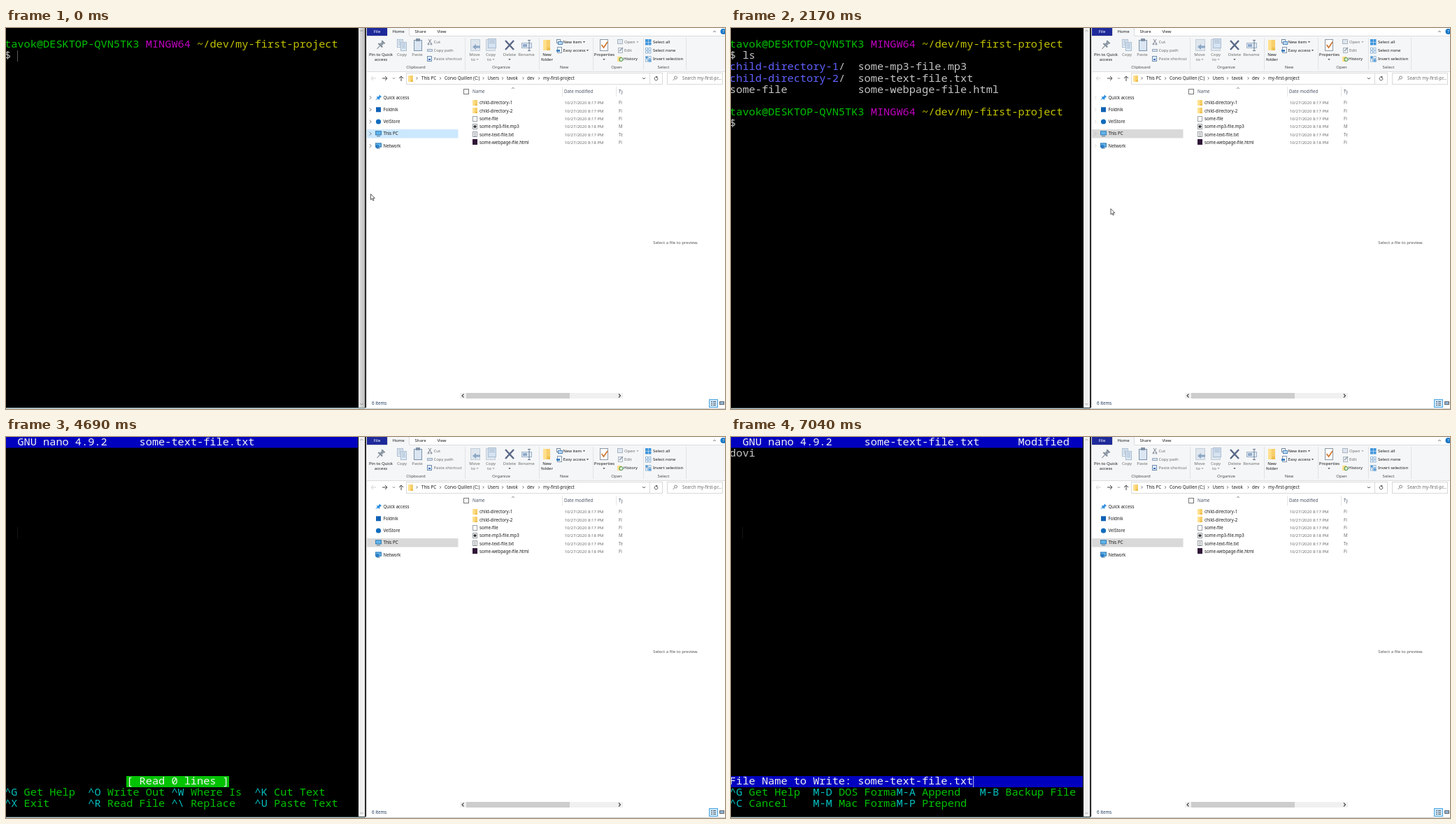
Animation of 1028x545 px, one loop 8 s. Source, as an HTML page with a canvas:

```html
<!DOCTYPE html>
<html lang="en">
<head>
<meta charset="utf-8">
<title>Terminal and file explorer</title>
<style>
html, body { margin: 0; width: 100%; height: 100%; overflow: hidden; background: #fff; }
canvas { display: block; width: 100vw; height: 100vh; }
</style>
</head>
<body>
<canvas id="stage" width="1028" height="545"></canvas>
<script>
const W = 1028, H = 545, LOOP = 8000;
const USER = 'tavok', HOST = 'DESKTOP-QVN5TK3', DIR = 'my-first-project', FILE = 'some-text-file.txt';
const MONO = '15.28px "Noto Sans Mono", "DejaVu Sans Mono", monospace';
const SANS = '"Noto Sans", "Open Sans", sans-serif';
const C = { text: '#c4c4c4', green: '#00c200', cyan: '#00bfbf', blue: '#6060ff', pink: '#bf00bf',
  gold: '#c2c200', bar: '#0000bf', white: '#f4f4f4', ink: '#1a1a1a', dim: '#6e6e6e' };

const stage = document.getElementById('stage').getContext('2d');
const backdrop = document.createElement('canvas');
backdrop.width = W;
backdrop.height = H;
let g = backdrop.getContext('2d');

function box(x, y, w, h, fill, stroke) {
  if (fill) { g.fillStyle = fill; g.fillRect(x, y, w, h); }
  if (stroke) { g.strokeStyle = stroke; g.lineWidth = 1; g.strokeRect(x + .5, y + .5, w - 1, h - 1); }
}
function path(pts, stroke, width = 1, fill) {
  g.beginPath();
  for (let i = 0; i < pts.length; i += 2) g.lineTo(pts[i], pts[i + 1]);
  if (fill) { g.closePath(); g.fillStyle = fill; g.fill(); }
  if (stroke) { g.strokeStyle = stroke; g.lineWidth = width; g.stroke(); }
}
function dot(x, y, r, fill, stroke) {
  g.beginPath();
  g.arc(x, y, r, 0, 7);
  if (fill) { g.fillStyle = fill; g.fill(); }
  if (stroke) { g.strokeStyle = stroke; g.lineWidth = 1; g.stroke(); }
}
// y is the middle of the text line
function label(s, x, y, color = C.ink, align = 'left', size = 6.2) {
  g.font = size + 'px ' + SANS;
  g.textAlign = align;
  g.fillStyle = color;
  g.fillText(s, x, y + 2.2);
}
const small = (s, x, y, color) => label(s, x, y, color, 'left', 5.95);
const mid = (s, x, y, color) => label(s, x, y, color, 'center', 6.05);
const right = (x, y, color, r = 1.7) => path([x - r / 2, y - r, x + r / 2, y, x - r / 2, y + r], color, .8);
const down = (x, y, color, r = 1.8) => path([x - r, y - r / 2, x, y + r / 2, x + r, y - r / 2], color, .9);
const up = (x, y, color, r = 1.8) => path([x - r, y + r / 2, x, y - r / 2, x + r, y + r / 2], color, .9);
const drop = (x, y, color) => path([x - 1.6, y - .8, x + 1.6, y - .8, x, y + 1], null, 0, color);

function folder(x, y, w, h) {
  box(x, y, w, h, '#f7cf6b');
  box(x, y, w * .45, h, '#ffe08c');
  box(x + w * .55, y + h * .72, w * .45, h * .28, '#eebd4e');
}
function sheet(x, y, w, h, lines = 0, fill = '#fff', edge = '#9aa0a6') {
  box(x, y, w, h, fill, edge);
  for (let i = 0; i < lines; i++) box(x + 2, y + 2 + i * 2, w - 4, 1, edge);
}

function ribbonIcons() {
  // pin
  g.save();
  g.translate(536, 24);
  g.rotate(.75);
  box(-3, -6, 6, 2, '#7b8896');
  box(-2, -4, 4, 4, '#8d99a6');
  box(-4, 0, 8, 2, '#7b8896');
  box(-.5, 2, 1, 6, '#7b8896');
  g.restore();
  // copy, paste
  sheet(559, 16, 9, 12, 4, '#e8eff7', '#a9bdd2');
  sheet(564, 20, 9, 13, 4, '#dce8f4', '#a9bdd2');
  sheet(583, 17, 12, 16, 0, '#dbe6f2', '#7c93ad');
  box(586, 15, 6, 4, '#8192a6');
  // cut, copy path, paste shortcut
  path([604, 16, 608, 22], '#7e8794');
  path([608, 16, 604, 22], '#7e8794');
  dot(604, 23, 1, null, '#7e8794');
  dot(608, 23, 1, null, '#7e8794');
  box(602, 30, 8, 4, '#d5dfeb', '#9aacc0');
  sheet(602, 40, 7, 8, 0, '#e3edf8', '#6f8db0');
  box(604, 44, 3, 2, '#3f73b5');
  // move to, copy to
  for (const x of [664, 686]) {
    sheet(x, 16, 14, 17, 0, '#dfe6ee', '#c3ced9');
    if (x > 680) sheet(x + 3, 15, 12, 14, 3, '#d6e3f1', '#a9bdd2');
  }
  path([667, 27, 672, 23, 672, 25.5, 678, 25.5, 678, 28.5, 672, 28.5, 672, 31], null, 0, '#8ba6c4');
  // delete, rename
  path([714, 18, 726, 31], '#596786', 2.4);
  path([726, 18, 714, 31], '#596786', 2.4);
  box(737, 21, 15, 8, '#e1eaf4', '#9db2ca');
  box(739, 23, 6, 4, '#8fa9c8');
  path([746, 17.5, 750, 17.5, 748, 17.5, 748, 32.5, 746, 32.5, 750, 32.5], '#66788f');
  // new folder, new item, easy access
  folder(768, 17, 10, 15);
  sheet(787, 16, 6, 6, 0, '#fff', '#72879e');
  box(789, 19, 7, 5, '#bcd8f0', '#4f87bd');
  sheet(788, 27, 7, 9, 0, '#fff', '#8396aa');
  box(787, 31, 5, 3, '#3f82c4');
  // properties
  sheet(849, 16, 12, 17, 0, '#fff', '#8c98a4');
  path([851.5, 24, 854.5, 28, 860, 20], '#d07a32', 1.8);
  // open, edit, history
  box(874, 16, 8, 7, '#dfe6ee', '#a8b5c2');
  box(875, 28, 7, 8, '#eef1f4', '#a8b5c2');
  path([877, 33, 882, 28], '#8a97a5', 1.2);
  folder(874, 41, 6, 7);
  dot(879.5, 45, 2.6, '#d9efd2', '#3d8a46');
  // selection tools
  for (let r = 0; r < 3; r++) for (let i = 0; i < 4; i++) {
    const on = r === 0 || (r === 2 && (i === 0 || i === 3));
    box(914 + (i % 2) * 4.5, 16 + r * 12 + (i >> 1) * 4.5, 4, 4,
      on ? '#3f96dc' : '#fff', r ? '#8fb6d8' : null);
  }
}

function ribbon() {
  box(516, 11, 512, 51, '#f5f6f7');
  box(516, 11, 512, 1, '#dadbdc');
  box(516, 62, 512, 1, '#dcdddf');
  box(516, 0, 29, 11, '#1e2a9a');
  box(545, 0, 32, 12, '#f5f6f7');
  box(545, 0, 1, 11, '#dadbdc');
  box(576, 0, 1, 11, '#dadbdc');
  mid('File', 530.5, 5, '#fff');
  mid('Home', 561, 5);
  mid('Share', 592.5, 5);
  mid('View', 623, 5);
  up(1013, 5, '#777', 2);
  dot(1025.5, 5, 4, '#1676c6');
  mid('?', 1025.5, 5, '#fff');
  for (const x of [656, 762, 839, 911, 972]) box(x, 14, 1, 46, '#e1e2e4');
  ribbonIcons();
  [['Clipboard', 586], ['Organize', 708], ['New', 798], ['Open', 873], ['Select', 940]]
    .forEach(([s, x]) => mid(s, x, 56, '#4c4c4c'));
  [['Pin to Quick', 536, 38], ['access', 536, 45], ['New', 773.5, 38], ['folder', 773.5, 45], ['Properties', 855.5, 38]]
    .forEach(([s, x, y]) => mid(s, x, y));
  [['Copy', 566, 38], ['Paste', 588, 38], ['Move', 670, 38], ['to', 668, 45], ['Copy', 693, 38],
    ['to', 691, 45], ['Delete', 720, 38], ['Rename', 744, 38]]
    .forEach(([s, x, y]) => mid(s, x, y, C.dim));
  [['Cut', 611.5, 20], ['Copy path', 611.5, 32], ['Paste shortcut', 611.5, 44], ['Open', 884, 20], ['Edit', 884, 32]]
    .forEach(([s, x, y]) => small(s, x, y, C.dim));
  [['New item', 796.5, 20], ['Easy access', 796.5, 32], ['History', 883, 44],
    ['Select all', 925, 20], ['Select none', 925, 32], ['Invert selection', 925, 44]]
    .forEach(([s, x, y]) => small(s, x, y));
  [[674, 45], [697, 45], [903, 20]].forEach(([x, y]) => drop(x, y, '#999'));
  [[720, 45], [855, 45], [826.5, 20], [831.5, 32]].forEach(([x, y]) => drop(x, y, '#333'));
}

function addressBar() {
  path([529, 72, 522, 72, 525, 69, 522, 72, 525, 75], '#d3d3d3');
  path([538, 72, 545, 72, 542, 69, 545, 72, 542, 75], '#444');
  down(554.5, 72, '#666', 1.5);
  path([565, 76, 565, 69, 562, 72, 565, 69, 568, 72], '#444');
  box(572, 64, 367, 17, '#fff', '#d9d9d9');
  box(920, 64, 1, 17, '#d9d9d9');
  folder(575, 68, 7, 9);
  [['This PC', 594], ['Corvo Quillen (C:)', 627], ['Users', 688.5], [USER, 716], ['dev', 745], [DIR, 768]]
    .forEach(([s, x]) => label(s, x, 72));
  [587.5, 621, 682.5, 710, 739.5, 762].forEach(x => right(x, 72, '#444'));
  down(912, 72, '#444', 2);
  g.beginPath();
  g.arc(929.5, 72.5, 2.4, -.4, 5);
  g.strokeStyle = '#444';
  g.lineWidth = .9;
  g.stroke();
  path([929, 69, 931.8, 69.5, 930.5, 72], null, 0, '#444');
  box(945, 64, 80, 17, '#fff', '#d9d9d9');
  dot(957.5, 71, 2, null, '#888');
  path([956, 72.5, 953.5, 75], '#888');
  label('Search my-first-pr...', 967, 72, '#6b6b6b');
}

function fileList() {
  box(654, 87, 8, 8, '#fff', '#777');
  label('Name', 667, 91, '#4a5566');
  label('Date modified', 798, 91, '#4a5566');
  up(725, 86, '#777', 1.8);
  for (const x of [795, 872]) box(x, 84, 1, 14, '#e5e5e5');
  const rows = [['child-directory-1', 'Fi'], ['child-directory-2', 'Fi'], ['some-file', 'Fi'],
    ['some-mp3-file.mp3', 'M'], [FILE, 'Te'], ['some-webpage-file.html', 'Fi']];
  rows.forEach(([name, type], i) => {
    const y = 107 + i * 11.35, top = Math.round(y) - 4;
    if (i < 2) folder(667, top, 7, 8);
    else if (i === 5) box(667, top - 1, 7, 8, '#2f1537');
    else sheet(667, top, 7, 8, i === 4 ? 3 : 0);
    if (i === 3) dot(670.5, top + 4, 2.1, '#333');
    label(name, 677, y);
    label(`10/27/2020 8:1${i === 3 || i === 5 ? 8 : 7} PM`, 798.5, y, C.dim, 'left', 6);
    label(type, 876, y, C.dim);
  });
  label('Ty', 876, 91, '#4a5566');
  box(881.5, 84, 6, 90, '#fff');
  box(649, 522, 233, 8, '#f0f0f0');
  box(658, 522, 148, 8, '#cdcdcd');
  path([654.5, 523.5, 652, 526, 654.5, 528.5], '#444', 1.1);
  path([876, 523.5, 878.5, 526, 876, 528.5], '#444', 1.1);
  mid('Select a file to preview.', 957.5, 307, '#555');
  label('6 items', 523, 537, '#1e395b');
  box(1005, 531, 13, 12, '#cce8ff', '#4aa5e0');
  for (let i = 0; i < 3; i++) {
    box(1008, 534 + i * 2.5, 2, 1, '#555');
    box(1011, 534 + i * 2.5, 4, 1, '#555');
  }
  box(1020, 534, 7, 5, '#8fb4d6', '#666');
}

function drawBackdrop() {
  box(0, 0, W, H, '#fff');
  box(0, 0, 504, 543, '#000');
  box(504, 0, 9, 543, '#f0f0f0');
  box(513, 0, 2, 543, '#2a2a2a');
  box(515, 0, 1, 543, '#e6e6e6');
  up(508.5, 4, '#999', 2);
  down(508.5, 538, '#999', 2);
  box(0, 544, W, 1, '#c9cfd0');
  ribbon();
  addressBar();
  fileList();
}

// the window in front casts its shadow on the other
function frames(active) {
  box(0, 543, 514, 1, active ? '#7f9a9e' : '#33484a');
  if (!active) return;
  const shade = g.createLinearGradient(504, 0, 513, 0);
  shade.addColorStop(0, 'rgba(0,0,0,.04)');
  shade.addColorStop(1, 'rgba(0,0,0,.22)');
  box(504, 0, 9, 543, shade);
}

const col = n => n * 9.167 - 1.9;
const row = n => n * 16.16;

function put(s, c, r, color = C.text) {
  g.font = MONO;
  g.textAlign = 'left';
  g.fillStyle = color;
  g.fillText(s, col(c), row(r) + 12);
}
function caret(c, r, color = '#5c5c5c') {
  box(Math.round(col(c)), Math.round(row(r)), 1, 16, color);
}
function prompt(r) {
  put(USER + '@' + HOST, 0, r, C.green);
  put('MINGW64', 22, r, C.pink);
  put('~/dev/' + DIR, 30, r, C.gold);
}
function keys(r, ...items) {
  items.forEach(([c, key, text]) => {
    put(text, c + key.length + 1, r, C.green);
    put(key, c, r, C.cyan);
  });
}

function shell(t, k) {
  prompt(1);
  const cmd = t < 930 ? '' : t < 1080 ? 'l' : 'ls';
  put('$ ' + cmd, 0, 2);
  if (t < 1230) { caret(2 + cmd.length, 2); return; }
  for (const n of [1, 2]) {
    put('child-directory-' + n, 0, 2 + n, C.blue);
    put('/', 17, 2 + n);
  }
  put('some-file', 0, 5);
  ['some-mp3-file.mp3', FILE, 'some-webpage-file.html'].forEach((s, i) => put(s, 20, 3 + i));
  if (t < 1320) return;
  prompt(7);
  if (t < 1380) return;
  const typed = t >= 2790 ? 'nano ' + FILE + ' ' : 'nano '.slice(0, [1, 3, 5][k - 7] || 0);
  put('$ ' + typed, 0, 8);
  if (t < 1700 || k > 6) caret(2 + typed.length, 8);
}

function nano(t) {
  box(0, 0, 503, 15.5, C.bar);
  put('GNU nano 4.9.2', 2, 0, C.white);
  put(FILE, 21, 0, C.white);
  caret(2, 8, '#161616');
  if (t >= 5280) {
    put('Modified', 45, 0, C.white);
    put('dovi', 0, 1);
  }
  if (t < 5960) {
    box(172, 485, 147, 16, C.green);
    put('[ Read 0 lines ]', 19, 30, C.white);
    keys(31, [0, '^G', 'Get Help'], [13, '^O', 'Write Out'], [26, '^W', 'Where Is'], [39, '^K', 'Cut Text']);
    keys(32, [0, '^X', 'Exit'], [13, '^R', 'Read File'], [26, '^\\', 'Replace'], [39, '^U', 'Paste Text']);
    if (t >= 5280) caret(4, 1);
    return;
  }
  box(0, 485, 503, 16, C.bar);
  if (t < 7040) {
    put('Save modified buffer?', 0, 30, C.white);
    caret(22, 30, '#4a4ad0');
    keys(31, [1, 'Y', 'Yes']);
    keys(32, [1, 'N', 'No'], [16, '^C', 'Cancel']);
  } else {
    put('File Name to Write: ' + FILE, 0, 30, C.white);
    caret(38, 30, '#b0b0e8');
    keys(31, [0, '^G', 'Get Help'], [13, 'M-D', 'DOS Forma'], [26, 'M-A', 'Append'], [39, 'M-B', 'Backup File']);
    keys(32, [0, '^C', 'Cancel'], [13, 'M-M', 'Mac Forma'], [26, 'M-P', 'Prepend']);
  }
}

function navPane(active, chevrons) {
  box(516, 145, 130.5, 12.5, active ? '#cce8ff' : '#d9d9d9');
  ['Quick access', 'Foldnik', 'VelStore', 'This PC', 'Network'].forEach((s, i) => {
    const y = 99.5 + i * 17.25;
    label(s, 539.5, y);
    if (i === 0) path([528, 103, 531, 100, 529.5, 98.5, 533, 98, 534, 95.5, 537, 98.5, 534.5, 100, 534, 103, 532, 101.5], null, 0, '#2f8fdf');
    if (i === 1) box(529, y - 3.5, 7, 7, '#0f62b5');
    if (i === 2) dot(532.5, y, 3.6, '#0f6cbd');
    if (i > 2) {
      box(528, y - 4, 9, 6, '#5fb4ea', '#3a7fb5');
      box(530, y + 3, 5, 1, '#5b7388');
    }
    if (i === 4) dot(531, y + 1, 2.6, '#2b7cc4');
    g.globalAlpha = chevrons;
    right(521, y, '#555', 2.4);
    g.globalAlpha = 1;
  });
}

function pointer(x, y) {
  if (x < 504) {
    path([x - 3, y - 7.5, x + 3, y - 7.5, x, y - 7.5, x, y + 7.5, x - 3, y + 7.5, x + 3, y + 7.5], '#d0d0d0');
    return;
  }
  g.save();
  g.translate(x, y);
  g.scale(.9, .9);
  path([0, 0, 0, 9.2, 2.1, 7.2, 3.6, 10.4, 5, 9.7, 3.6, 6.7, 6.4, 6.5, 0, 0], '#333', .9, '#fff');
  g.restore();
}

const ease = u => u * u * (3 - 2 * u);
const REST = [433, 221];
function glide(from, to, u) {
  const e = ease(u);
  pointer(from[0] + (to[0] - from[0]) * e, from[1] + (to[1] - from[1]) * e);
}

function draw(t) {
  g = stage;
  g.drawImage(backdrop, 0, 0);
  // pointer moves are sampled in steps of about 78 ms
  const a = t < 70 ? 0 : Math.min(7, 1 + Math.floor((t - 70) / 78));
  const b = t < 1700 ? -1 : Math.min(9, Math.floor((t - 1700) / 78));
  const active = a < 7;
  let chevrons = 0;
  if (t < 770) chevrons = a < 4 ? 1 : 1 - (a - 3) * .21;
  else if (b > 4) chevrons = [.12, .25, .15, .06, 0][b - 5];
  frames(active);
  navPane(active, chevrons);

  g.save();
  g.beginPath();
  g.rect(0, 0, 504, 543);
  g.clip();
  if (t < 4690) shell(t, b);
  else nano(t);
  g.restore();

  if (t < 1000) glide([521.5, 237.5], REST, a / 7);
  else if (b >= 0 && b < 7) glide(REST, [543, 258.5], b / 6);
  else if (b === 7) pointer(488, 242);
}

drawBackdrop();
const start = performance.now();
function tick() {
  draw((performance.now() - start) % LOOP);
  requestAnimationFrame(tick);
}
tick();
</script>
</body>
</html>
```
